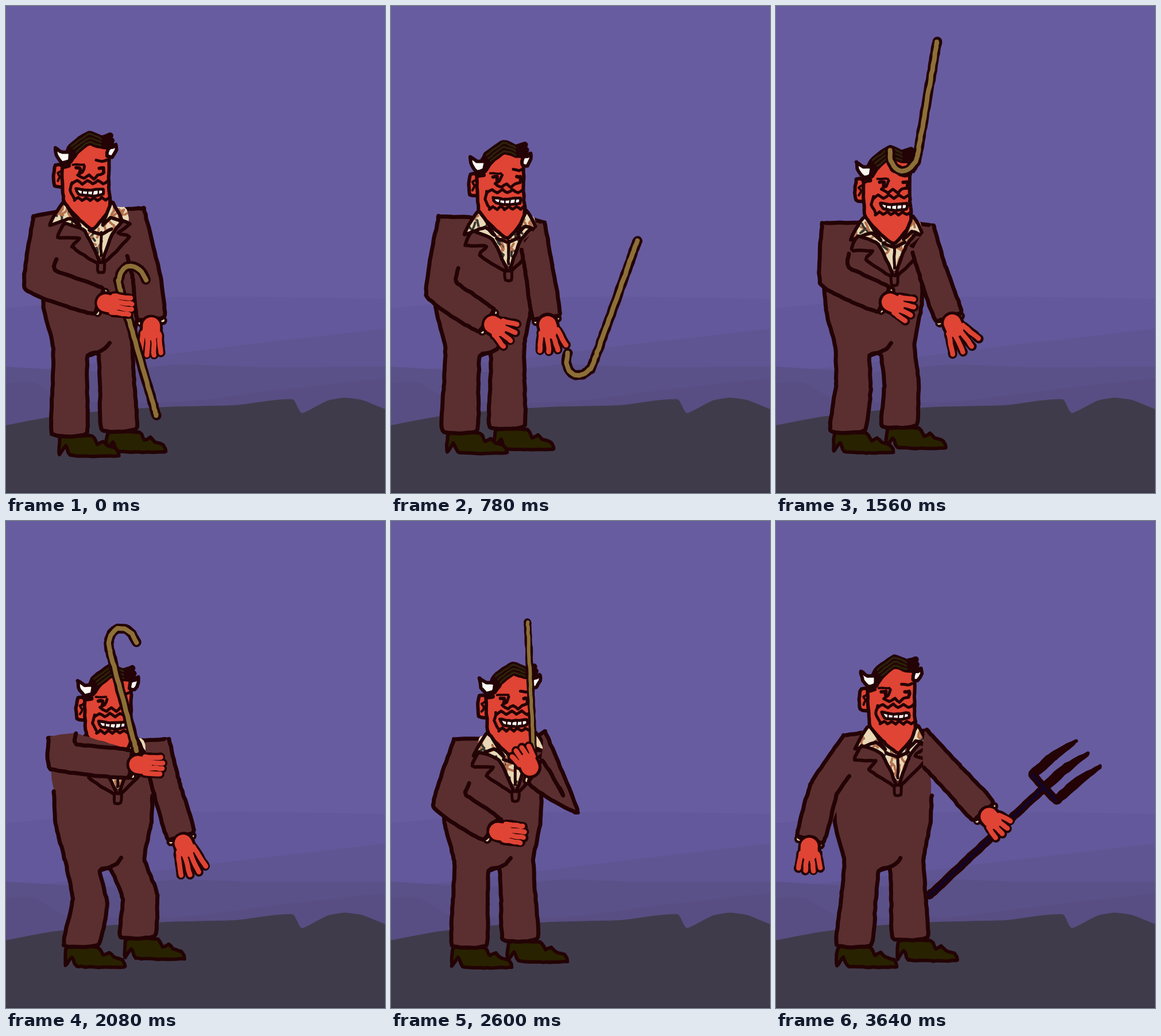
These frames come from a looping animation (660x848 px, 3.77 s). An HTML page with a canvas:

```html
<!DOCTYPE html>
<html lang="en">
<head>
<meta charset="utf-8">
<title>Devil with a cane</title>
<style>
html, body { margin: 0; width: 100%; height: 100%; overflow: hidden; background: #685ca1; }
canvas { display: block; }
</style>
</head>
<body>
<canvas id="c" width="660" height="848"></canvas>
<script>
const ctx = document.getElementById('c').getContext('2d');
const STEP = 130, COUNT = 29;
const INK = '#230305', SUIT = '#5b2f30', RED = '#e04434', SHOE = '#282200', CREAM = '#e8d8b6',
      RUST = '#b4704e', TAN = '#8d7038', HAIR = '#2b2409', WHITE = '#fbf8f4';

// Joints of the figure; left and right as seen. Hands: angle, finger spread, length.
const poses = [
  { at: 0, head: [-62, -15], turn: 0, waist: 149, bend: 0, feet: [110, 745, 197, 738],
    left: [48, 366, 33, 492, 152, 536], handL: [8, 0, 58],
    right: [240, 352, 268, 465, 276, 541], handR: [92, 4, 62] },
  { at: 3, head: [-22, -5], turn: 0, waist: 153, bend: 0, feet: [118, 740, 199, 731],
    left: [82, 354, 45, 488, 152, 546], handL: [28, 11, 54],
    right: [267, 370, 273, 460, 267, 548], handR: [103, 6, 56] },
  { at: 9, head: [2, 6], turn: 8, waist: 170, bend: 0, feet: [121, 740, 205, 736],
    left: [84, 378, 78, 520, 152, 587], handL: [34, 15, 52],
    right: [268, 384, 290, 450, 320, 527], handR: [52, 16, 62] },
  { at: 16, head: [-23, 16], turn: 0, waist: 170, bend: 14, feet: [131, 738, 229, 724],
    left: [74, 378, 78, 432, 213, 447], handL: [2, 0, 55],
    right: [284, 380, 302, 455, 327, 541], handR: [70, 8, 68] },
  { at: 20, head: [6, 12], turn: 0, waist: 177, bend: 0, feet: [136, 739, 225, 729],
    left: [110, 380, 74, 497, 160, 555], handL: [8, 0, 58],
    right: [268, 366, 325, 507, 240, 458], handR: [238, 5, 48] },
  { at: 24, head: [-3, 7], turn: 0, waist: 181, bend: 0, feet: [141, 733, 234, 724],
    left: [110, 375, 60, 468, 25, 546], handL: [108, 10, 58],
    right: [258, 362, 320, 498, 230, 458], handR: [250, 3, 54] },
  { at: 28, head: [0, 0], turn: 0, waist: 186, bend: 0, feet: [136, 738, 234, 727],
    left: [118, 373, 62, 455, 37, 547], handL: [90, 7, 54],
    right: [263, 364, 320, 425, 378, 489], handR: [42, 9, 50] }
];
// arc and turns describe the flight to the next entry
const cane = [
  { at: 0, pos: [230, 602], tilt: 16, half: 116, hook: 1, arc: [0, 0], turns: 0 },
  { at: 4, pos: [230, 602], tilt: 16, half: 116, hook: 1, arc: [185, 40], turns: 1 },
  { at: 9, pos: [188, 288], tilt: 16.6, half: 107, hook: 1, arc: [70, -140], turns: 1 },
  { at: 16, pos: [204, 312], tilt: 15, half: 91, hook: 1, arc: [200, 0], turns: -1 },
  { at: 20, pos: [243, 289], tilt: 2.5, half: 113, hook: 0, arc: [0, 0], turns: 0 },
  { at: 22, pos: [243, 289], tilt: 0, half: 113, hook: 0 }
];
const fork = [
  { at: 22, pos: [238, 385], tilt: -5, half: 130, lean: -12, arc: [0, 0], turns: 0 },
  { at: 24, pos: [228, 424], tilt: -13, half: 134, lean: -12, arc: [30, -10], turns: 0 },
  { at: 28, pos: [367, 558], tilt: -46.8, half: 137, lean: 9 }
];

const ease = t => t * t * (3 - 2 * t);
const mix = (a, b, t) => Array.isArray(a) ? a.map((v, i) => mix(v, b[i], t)) : a + (b - a) * t;
const rad = deg => deg * Math.PI / 180;
const pairs = a => a.reduce((r, v, i) => (i % 2 ? r[r.length - 1].push(v) : r.push([v]), r), []);
const go = (p, d, n) => [p[0] + d[0] * n, p[1] + d[1] * n];
function unit(a, b) {
  const x = b[0] - a[0], y = b[1] - a[1], d = Math.hypot(x, y) || 1;
  return [x / d, y / d];
}

function blend(list, step, curve) {
  let k = 0;
  while (k < list.length - 2 && list[k + 1].at <= step) k++;
  const a = list[k], b = list[k + 1], t = (step - a.at) / (b.at - a.at), out = {};
  for (const f in b) out[f] = mix(a[f], b[f], curve(t));
  if (a.arc) {
    out.pos = go(out.pos, a.arc, 4 * t * (1 - t));
    out.tilt = mix(a.tilt, b.tilt, t) + 360 * a.turns * t;
  }
  return out;
}

let seed = 1;
const rnd = () => (seed = (seed * 16807) % 2147483647) / 2147483647;

// Softly bent, slightly shaky line through the points
function trace(p, closed, rough = 1.3) {
  const n = p.length, last = closed ? n : n - 1, bend = .22;
  const at = i => closed ? p[(i + n) % n] : p[Math.max(0, Math.min(n - 1, i))];
  ctx.beginPath();
  for (let i = 0; i < last; i++) {
    const [a, b, c, d] = [at(i - 1), at(i), at(i + 1), at(i + 2)];
    const steps = Math.max(2, Math.ceil(Math.hypot(c[0] - b[0], c[1] - b[1]) / 7));
    for (let s = 0; s < steps + (i === last - 1 ? 1 : 0); s++) {
      const t = s / steps, h = ease(t), u = t * (1 - t) * (1 - t), w = -t * t * (1 - t);
      const q = [0, 1].map(j => b[j] + (c[j] - b[j]) * h
        + bend * ((c[j] - a[j]) * u + (d[j] - b[j]) * w) + (rnd() - .5) * rough);
      ctx.lineTo(q[0], q[1]);
    }
  }
  if (closed) ctx.closePath();
}
function ink(p, width = 7, color = INK) {
  trace(p);
  ctx.lineWidth = width; ctx.strokeStyle = color; ctx.stroke();
}
function shape(p, fill, width = 7) {
  trace(p, true);
  ctx.fillStyle = fill; ctx.fill();
  if (width) { ctx.lineWidth = width; ctx.strokeStyle = INK; ctx.stroke(); }
}
const line = (p, w, c) => ink(pairs(p), w, c);
const blob = (p, c, w) => shape(pairs(p), c, w);
function at(x, y, draw) { ctx.save(); ctx.translate(x, y); draw(); ctx.restore(); }

function zigzag(x0, x1, y, height, n, width) {
  ink(Array.from({ length: n + 1 }, (_, i) =>
    [mix(x0, x1, i / n), y + (i % 2 ? -height : height) / 2]), width);
}

function band(color, top) {
  trace(pairs(top), false, 0);
  ctx.lineTo(660, 848); ctx.lineTo(0, 848);
  ctx.fillStyle = color; ctx.fill();
}
function backdrop() {
  ctx.fillStyle = '#685ca1'; ctx.fillRect(0, 0, 660, 848);
  band('#63589b', [0, 526, 200, 509, 400, 506, 660, 510]);
  band('#5f5592', [0, 640, 240, 612, 400, 592, 660, 562]);
  band('#5b5189', [0, 628, 170, 637, 300, 624, 450, 629, 660, 628]);
  band('#584e83', [0, 656, 50, 656, 110, 688, 300, 690, 480, 668, 660, 648]);
  band('#403b4b', [0, 730, 80, 715, 180, 704, 280, 698, 400, 695, 460, 687, 500, 685,
    515, 709, 560, 687, 590, 682, 620, 686, 660, 702]);
  ctx.fillStyle = '#383548'; ctx.fillRect(0, 846, 660, 2);
}

function shoe() {
  blob([109, 735, 106, 767, 117, 752, 125, 768, 168, 770, 210, 769,
    205, 757, 190, 752, 182, 744, 172, 749, 163, 735], SHOE, 6);
}

function body(p) {
  const l = p.waist - 83, r = p.waist + 83, [lx, ly, rx, ry] = p.feet;
  const [cx, cy] = [p.waist + 3, 606], [nx, ny] = p.chest;
  const side = (hip, foot) => {
    const m = mix(hip, foot, .45);
    return [hip, [m[0] + p.bend, m[1]], foot];
  };
  const b = [
    [nx + 158, ny + 366], p.left[0], [l - 4, 470], [l, 530],
    ...side([l + 16, 592], [lx - 30, ly]), ...side([cx - 10, cy + 3], [lx + 30, ly]).reverse(),
    ...side([cx + 9, cy], [rx - 30, ry]), ...side([r - 12, 588], [rx + 30, ry - 2]).reverse(),
    [r, 525], [r + 2, 478], p.right[0], [nx + 243, ny + 366]
  ];
  shape(b, SUIT, 0);
  ink(b.slice(0, 2)); ink(b.slice(2, 18)); ink(b.slice(18));
  line([cx - 10, cy + 3, cx + 8, cy - 3, cx + 20, cy - 9, cx + 28, cy - 19]);
}

function printed(p, width) {
  blob(p, CREAM, 0);
  ctx.save(); ctx.clip();
  for (let i = 0; i < 60; i++) {
    const x = 136 + rnd() * 128, y = 356 + rnd() * 94;
    line([x, y, x + rnd() * 18 - 9, y + 8, x + rnd() * 16 - 8, y + 15], 4, i % 3 ? RUST : '#363630');
  }
  ctx.restore();
  if (width) { trace(pairs(p), true); ctx.lineWidth = width; ctx.strokeStyle = INK; ctx.stroke(); }
}
const shirt = () => printed([152, 362, 150, 390, 178, 402, 212, 450, 240, 415, 260, 386, 252, 362], 0);
function collar() {
  printed([162, 357, 138, 397, 174, 385, 190, 398], 6);
  printed([246, 356, 264, 389, 244, 383, 230, 397], 6);
}
function lapels() {
  line([192, 402, 212, 409, 230, 400], 6);
  blob([149, 390, 137, 414, 174, 416, 162, 431, 210, 461, 184, 404], SUIT, 6);
  blob([250, 386, 262, 391, 242, 407, 261, 414, 214, 461, 232, 408], SUIT, 6);
  line([212, 406, 212, 446], 5);
  blob([206, 459, 218, 459, 217, 475, 207, 475], SUIT, 5);
}

function head(turn, bothHorns) {
  blob([160, 293, 148, 292, 145, 310, 147, 328, 161, 329], RED, 6);
  line([159, 302, 152, 306, 156, 312, 152, 320], 4);
  blob([160, 290, 175, 262, 195, 248, 215, 252, 240, 264, 241, 330, 243, 350, 241, 372,
    213, 404, 188, 385, 163, 356], RED, 6);
  if (bothHorns) blob([253, 256, 254, 266, 247, 278, 238, 276, 240, 264], WHITE, 6);
  const strands = [0, 1, 2].map(i => [165 + 4 * i, 285, 176 + 4 * i, 259 + 5 * i, 206, 238 + 7 * i,
    227, 246 + 6 * i, 243 + 2 * i, 241 + 9 * i]);
  strands.forEach(s => line(s, 11));
  strands.forEach(s => line(s.slice(2, 8), 3, HAIR));
  blob([148, 262, 151, 278, 160, 288, 172, 285, 174, 270, 160, 270], WHITE, 6);
  line([162, 295, 171, 293], 8);
  at(turn, 0, () => {
    line([179, 291, 198, 291], 4);
    line([219, 284, 229, 286, 237, 283], 5);
    for (const x of [186, 227]) line([x - 2, 297, x + 5, 297, x + 5, 304], 6);
    line([199, 294, 195, 304, 187, 309, 198, 315, 207, 309, 215, 316, 222, 309, 231, 307], 5);
  });
  zigzag(177, 240, 322, 6, 7, 5);
  line([177, 322, 174, 336, 181, 350], 5);
  zigzag(181, 242, 351, 5, 9, 5);
  at(turn, 0, () => {
    blob([184, 333, 205, 336, 231, 334, 231, 343, 213, 346, 189, 343], WHITE, 5);
    for (let x = 196; x < 230; x += 9) line([x, 335, x - 1, 345], 2.5);
  });
}

// Sleeve outline from the outer edge: shoulder, elbow, cuff. The inner edge is offset from it.
function sleeve([sh, el, cuff], side) {
  const normal = d => [d[1] * side, -d[0] * side];
  const d1 = unit(sh, el), d2 = unit(el, cuff), n1 = normal(d1), n2 = normal(d2);
  const dot = n1[0] * n2[0] + n1[1] * n2[1];
  const fold = go(el, [n1[0] + n2[0], n1[1] + n2[1]], 48 / Math.max(.8, 1 + dot));
  const inner = go(cuff, n2, 47), end = go(fold, d1, -14 - 25 * Math.max(0, dot));
  const p = [sh, el, cuff, inner, fold, end];
  const rim = [go(go(cuff, n2, 4), d2, 6), go(go(inner, n2, -4), d2, 6)];
  shape(p, SUIT, 0);
  shape([sh, inner, end], SUIT, 0);
  ink(rim, 15);
  ink(rim, 6, CREAM);
  ink([mix(...rim, .35), mix(...rim, .6)], 5, RUST);
  ink(p);
  return mix(...rim, .5);
}

function hand(wrist, [angle, spread, length]) {
  const aim = a => [Math.cos(rad(a)), Math.sin(rad(a))];
  const along = aim(angle), across = aim(angle + 90);
  const palm = [go(wrist, along, 8), go(wrist, along, 18)];
  const fingers = [-1.5, -.5, .5, 1.5].map(i => {
    const base = go(go(wrist, along, 20), across, i * 9.5);
    return [base, go(base, aim(angle + i * spread), length - 22 - Math.abs(i) * 4)];
  });
  for (const [fat, thin, color] of [[40, 16, INK], [30, 8.5, RED]]) {
    ink(palm, fat, color);
    fingers.forEach(f => ink(f, thin, color));
  }
}

// Turns (along, across) from the middle of a pole into stage points
function pole({ pos, tilt }) {
  const s = Math.sin(rad(tilt)), c = Math.cos(rad(tilt));
  return (u, v) => [pos[0] - s * u + c * v, pos[1] - c * u - s * v];
}
function drawCane(c) {
  const put = pole(c), h = c.hook, p = [put(-c.half, 0), put(c.half, 0)];
  if (h > .1) for (let a = 25; a <= 180; a += 31)
    p.push(put(c.half + 32 * h * Math.sin(rad(a)), 24 * h * (1 - Math.cos(rad(a)))));
  ink(p, 13 + 4 * h);
  ink(p, 6 + 2 * h, TAN);
}
function drawFork(f) {
  const put = pole(f), h = f.half;
  const rods = [[put(-h, 0), put(h, 0)], [put(h, -30), put(h, 31)]];
  rods.forEach(r => ink(r, 15));
  for (const v of [-30, 0, 31]) {
    const mid = v + f.lean * .1;
    shape([put(h, v - 5), put(h + 50, mid - 5), put(h + 97, v + f.lean),
      put(h + 50, mid + 6), put(h, v + 5)], INK, 6);
  }
  rods.forEach(r => ink(r, 5, '#12052b'));
}

function draw(step) {
  seed = 977 * (step + 3);
  const p = blend(poses, step, ease), [lx, ly, rx, ry] = p.feet;
  const forked = step >= 22, swapped = step >= 17;
  p.left = pairs(p.left);
  p.right = pairs(p.right);
  p.chest = [p.head[0] * .75, p.head[1] * .9 + 2];
  ctx.lineCap = ctx.lineJoin = 'round';
  backdrop();
  at(rx - 128, ry - 731, shoe);
  at((lx - 136) / 2, ly - 731, shoe);
  body(p);
  at(...p.chest, shirt);
  at(...p.head, () => head(p.turn, step < 22 || step > 25));
  at(...p.head, collar);
  at(...p.chest, lapels);
  const wristR = sleeve(p.right, -1), wristL = sleeve(p.left, 1);
  if (!swapped) hand(wristR, p.handR);
  if (forked) drawFork(blend(fork, step, t => t));
  else drawCane(blend(cane, step, t => t));
  if (swapped) hand(wristR, p.handR);
  hand(wristL, p.handL);
}

let shown = -1;
const start = performance.now();
function tick(now) {
  const step = Math.floor(Math.max(0, now - start) / STEP) % COUNT;
  if (step !== shown) draw(shown = step);
  requestAnimationFrame(tick);
}
tick(start);
</script>
</body>
</html>
```
